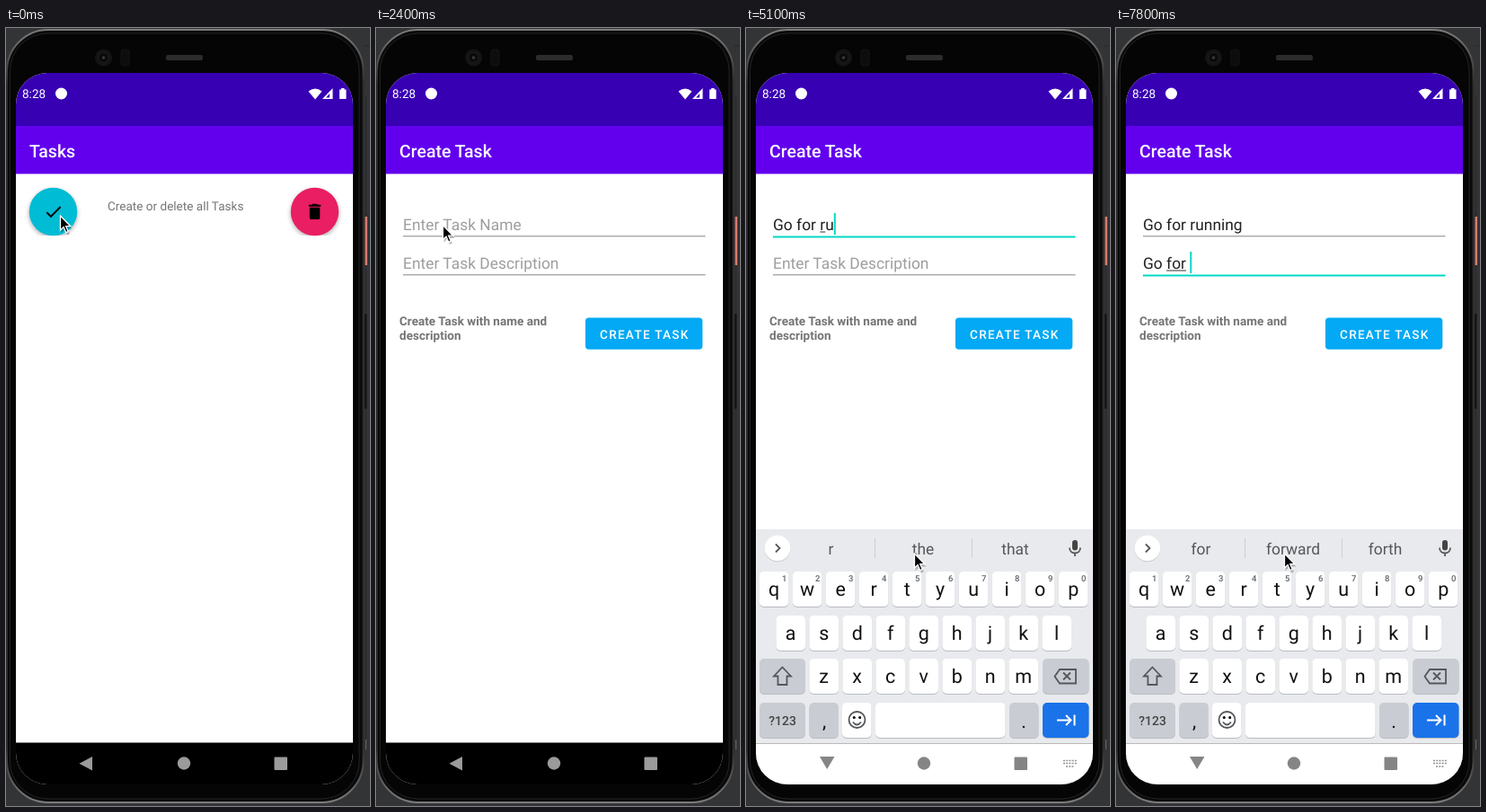
An HTML page that plays this animation: 405x866 px, repeating every 8 s.

```html
<!DOCTYPE html>
<html lang="en">
<head>
<meta charset="utf-8">
<title>Tasks</title>
<style>
  html, body { margin: 0; width: 100%; height: 100%; overflow: hidden; background: #323436; }
  svg { display: block; width: 405px; height: 866px; font-family: Roboto, sans-serif; }
  text { white-space: pre; text-rendering: geometricPrecision; }
  .mid { text-anchor: middle; }
  .title { font-size: 19.55px; font-weight: 500; fill: #fff; }
  .small { font-size: 13.55px; }
  .field { font-size: 17.42px; }
  .key { font-size: 21.5px; fill: #111; }
  .line { fill: none; stroke: #54575b; stroke-width: 1.8; }
</style>
</head>
<body>
<svg viewBox="0 0 405 866">
  <defs>
    <clipPath id="screen"><rect x="11" y="50" width="375" height="792" rx="35"/></clipPath>
    <clipPath id="fabRow"><rect x="11" y="163" width="376" height="68"/></clipPath>
    <filter id="blur" x="-40%" y="-40%" width="180%" height="180%"><feGaussianBlur stdDeviation="2.6"/></filter>
    <linearGradient id="rim" x2="0" y2="1">
      <stop offset="0" stop-color="#7c7c7c"/><stop offset=".07" stop-color="#2c2c2c"/>
      <stop offset=".93" stop-color="#2c2c2c"/><stop offset="1" stop-color="#7c7c7c"/>
    </linearGradient>
    <g id="window">
      <rect x="11" y="50" width="375" height="792" fill="#fff"/>
      <rect x="11" y="50" width="375" height="59" fill="#3700b3"/>
      <rect x="11" y="109" width="375" height="53.400" fill="#6200ee"/>
      <rect x="11" y="795.500" width="375" height="46.500" fill="#000"/>
    </g>
  </defs>

  <!-- device -->
  <rect width="405" height="866" fill="#323436"/>
  <path d="M400.500 75V800M398 20H405" stroke="#26282a" fill="none"/>
  <rect x="399.500" y="210" width="2.500" height="54" fill="#d67a6b"/>
  <rect x="399" y="318" width="2.500" height="106" rx="1" fill="#141517"/>
  <path d="M400.500 792V803" stroke="#666" fill="none"/>
  <rect x="1" y="2" width="396.500" height="860" rx="46" fill="#0a0a0a" stroke="url(#rim)" stroke-width="2"/>
  <rect x="4.500" y="6" width="388.500" height="852" rx="42" fill="#050505" stroke="#222"/>
  <circle cx="108.500" cy="33" r="9.500" fill="#141414"/>
  <circle cx="108.500" cy="33" r="5.500" fill="#0a0a0a" stroke="#1f1f1f"/>
  <circle cx="108.500" cy="33" r="1.800" fill="#3a3a3a"/>
  <rect x="128" y="24" width="9" height="18" rx="3" fill="#0d0d0d" stroke="#151515"/>
  <rect x="178" y="30" width="41" height="6" rx="2" fill="#2c2c2c"/>

  <g clip-path="url(#screen)">
    <rect x="11" y="50" width="375" height="792" fill="#000"/>

    <g id="home">
      <use href="#window"/>
      <text class="title" x="26" y="143.500">Tasks</text>
      <g clip-path="url(#fabRow)">
        <circle id="shade" cx="52.500" cy="206.500" r="27" opacity=".3" filter="url(#blur)"/>
        <circle cx="343.500" cy="206.500" r="27" opacity=".3" filter="url(#blur)"/>
      </g>
      <circle id="fab" cx="52.500" cy="204.500" r="26.700" fill="#00bcd4"/>
      <circle cx="343.500" cy="204.500" r="26.700" fill="#e91e63"/>
      <path transform="translate(41.300 193)scale(.954)" d="M9 16.170 4.830 12l-1.420 1.410L9 19 21 7l-1.410-1.410z"/>
      <path transform="translate(332.100 193)scale(.954)" d="M6 19c0 1.100.9 2 2 2h8c1.100 0 2-.9 2-2V7H6zM19 4h-3.500l-1-1h-5l-1 1H5v2h14z"/>
      <text class="small" x="113" y="203" fill="#757575">Create or delete all Tasks</text>
    </g>

    <g id="create">
      <use href="#window"/>
      <text class="title" x="26" y="143.500">Create Task</text>
      <g id="fields"></g>
      <g class="small" font-weight="700" fill="#757575">
        <text x="26" y="331">Create Task with name and</text>
        <text x="26" y="347">description</text>
      </g>
      <rect x="233" y="322.600" width="130.300" height="35.200" rx="3.800" fill="#03a9f4"/>
      <text class="small" x="249" y="345.500" fill="#fff" font-weight="500" letter-spacing="1.300">CREATE TASK</text>
    </g>

    <!-- status bar -->
    <g fill="#fff">
      <text class="small" x="18" y="78.300">8:28</text>
      <circle cx="61.500" cy="73" r="6.500"/>
      <path d="M336.500 70.500Q344 64.500 351.500 70.500L344 79.500Z"/>
      <path d="M363.500 67V79H352Z"/>
      <path d="M360 73V77.500H356Z" fill="#3700b3"/>
      <path d="M371 68.500H373V67H376.500V68.500H378.500V79H371Z"/>
    </g>

    <g id="board">
      <rect x="11" y="558" width="376" height="238.500" fill="#e8eaed"/>
      <rect x="11" y="796.500" width="376" height="46" fill="#fff"/>
      <g id="keys"></g>
      <circle cx="35" cy="580" r="14.300" fill="#c8cacd"/>
      <circle cx="35" cy="579" r="14.300" fill="#fff"/>
      <path id="chevron" class="line"/>
      <g id="tools">
        <g class="line">
          <circle cx="82.500" cy="577.500" r="5"/><path d="M86 581 92 587"/>
          <path d="M132 572H144.500V581L140 586H132ZM144.500 581H140V586M134.500 579.500Q137 583 140 579.500"/>
          <path d="M239 573H252V587H239ZM242 578H249M242 581H249M242 584H247M242.500 573V571H248.500V573"/>
        </g>
        <path d="M135 575h1.600v2H135zM140 575h1.600v2H140zM242.500 570h6v4.500h-6z" fill="#54575b"/>
        <text class="mid" x="191" y="584" font-size="14.500" font-weight="900" letter-spacing=".6" fill="#54575b">GIF</text>
        <path d="M279.500 568V590" stroke="#cbcdd1"/>
        <g fill="#54575b"><circle cx="306.500" cy="579" r="2"/><circle cx="312.500" cy="579" r="2"/><circle cx="318.500" cy="579" r="2"/></g>
      </g>
      <g id="words">
        <path d="M143.500 568V590M251.500 568V590" stroke="#cbcdd1"/>
        <g class="field mid" fill="#54575b">
          <text x="94.500" y="585.500"></text><text x="197" y="585.500"></text><text x="299.500" y="585.500"></text>
        </g>
      </g>
      <rect x="363" y="570" width="6" height="11.500" rx="3" fill="#444"/>
      <path class="line" d="M360 578.500C360 586.500 372 586.500 372 578.500M366 584.500V588"/>
    </g>

    <g id="nav">
      <path id="back"/>
      <circle cx="198" cy="818.500" r="7.200"/>
      <rect x="298.500" y="811.500" width="14.500" height="14.500" rx="1"/>
      <path id="hide" d="M353 815.500H368M353 818.500H368M356 822H365" fill="none" stroke="#909090" stroke-width="1.700" stroke-dasharray="2 1.200"/>
    </g>
  </g>

  <g id="mouse">
    <path d="M1 2V19L5 15.500 7.500 21.500 10.500 20 8 14.500H13Z" opacity=".25"/>
    <path d="M0 0V16L3.600 12.600 6.200 18.700 8.700 17.600 6.200 11.700H11.300Z" stroke="#fff" stroke-width="1.300"/>
  </g>
</svg>
<script>
const $ = id => document.getElementById(id);
const LOOP = 8000, STEP = 100;

// Typing: time, field, text with the composing part between underscores, suggestions
const typing = [
  [0, -1, '', ''],
  [2800, 0, '', ''],
  [4200, 0, '_G_', ''],
  [4300, 0, '_Go_', 'G The I'],
  [4400, 0, '_Go_', 'Go Good God'],
  [4500, 0, '_Go_ ', 'Go Good God'],
  [4600, 0, 'Go _f_', 'f for from'],
  [4700, 0, 'Go _for_', 'for forward forth'],
  [4800, 0, 'Go _for_ ', 'for forward forth'],
  [5000, 0, 'Go for _r_', 'for forward forth'],
  [5100, 0, 'Go for _r_u', 'r the that'],
  [5400, 0, 'Go for _ru_', 'ru run rub'],
  [5600, 0, 'Go for _run_', 'run running runs'],
  [5700, 0, 'Go for _runn_', 'runn running runner'],
  [6000, 0, 'Go for _runni_', 'runni running runner'],
  [6100, 0, 'Go for _runnin_', 'runnin running runner'],
  [6200, 0, 'Go for _running_', 'runnin running runnings'],
  [6400, 0, 'Go for running', 'running runnings runner'],
  [6500, 1, '', ''],
  [6900, 1, '_G_', ''],
  [7000, 1, '_Go_', 'G The I'],
  [7200, 1, '_Go_', 'Go Good God'],
  [7300, 1, '_Go_ ', 'Go Good God'],
  [7400, 1, 'Go _f_', 'Go Good God'],
  [7500, 1, 'Go _f_', 'f for from'],
  [7700, 1, 'Go _for_', 'for forward forth'],
  [7800, 1, 'Go _for_ ', 'for forward forth']
];

// Pointer: start, end, x, y
const moves = [[200, 400, 56.500, 206], [2200, 2400, 74.500, 219.500], [3000, 3500, 187.500, 585]];
const start = [60.5, 209];

const hints = ['Enter Task Name', 'Enter Task Description'];
$('fields').innerHTML = hints.map((_, i) => `<g transform="translate(30 ${225 + 43 * i})">
  <text class="field"></text><rect y="1.500" height="1" fill="#333"/>
  <rect class="rule" x="0" width="336.500"/><rect class="caret" y="-19" width="2" height="24" fill="#03dac5"/></g>`).join('');
const fields = [...$('fields').children].map(g => [...g.children]);

function key(x, y, w, fill = '#fff') {
  return `<rect x="${x}" y="${y + 1}" width="${w}" height="39" rx="5" fill="#b9bcc1"/>
    <rect x="${x}" y="${y}" width="${w}" height="39" rx="5" fill="${fill}"/>`;
}
function row(letters, x, y) {
  return [...letters].map((c, i) => {
    const cx = x + 37 * i;
    const digit = y < 610 ? `<text class="mid" x="${cx + 11.5}" y="616" font-size="9.500" font-weight="500" fill="#5f6368">${(i + 1) % 10}</text>` : '';
    return key(cx - 16.3, y, 32.6) + `<text class="key mid letter" x="${cx}" y="${y + 27}">${c}</text>` + digit;
  }).join('');
}
const grey = '#c9cdd3';
$('keys').innerHTML = row('qwertyuiop', 31.2, 605) + row('asdfghjkl', 49.7, 654) + row('zxcvbnm', 86.7, 702)
  + key(15, 702, 51, grey) + key(330, 702, 51.5, grey)
  + key(15, 751, 51, grey) + key(70.5, 751, 32.5, grey) + key(107, 751, 32.5)
  + key(144, 751, 144.5) + key(293, 751, 32.5, grey) + key(330, 751, 51.5, '#1a73e8')
  + `<path id="shift" class="line" d="M40.500 711.500 50 721.500H45.500V731H35.500V721.500H31Z"/>
  <path class="line" d="M349 714H367V729.500H349L343.500 721.700ZM353 717.500 361 725.500M361 717.500 353 725.500"/>
  <text class="mid" x="40.500" y="775.500" font-size="14" font-weight="500" fill="#444">?123</text>
  <text class="key mid" x="87" y="779">,</text><text class="key mid" x="309" y="779">.</text>
  <circle class="line" cx="123.500" cy="770" r="9"/><path class="line" d="M119 772.500Q123.500 778.500 128 772.500"/>
  <circle cx="120.300" cy="767.500" r="1.500"/><circle cx="126.700" cy="767.500" r="1.500"/>
  <path d="M346 770.500H361M356 765 361.500 770.500 356 776M365.500 764.500V776.500" fill="none" stroke="#fff" stroke-width="2"/>`;
const letters = [...document.querySelectorAll('.letter')];
const words = [...$('words').querySelectorAll('text')];

const part = (t, a, b) => Math.min(1, Math.max(0, (t - a) / (b - a)));
const show = (el, on) => el.setAttribute('display', on ? 'inline' : 'none');
function set(el, attrs) { for (const k in attrs) el.setAttribute(k, attrs[k]); }

function bezier(x, x1, y1, x2, y2) {
  const at = (u, a, b) => 3 * u * (1 - u) ** 2 * a + 3 * u * u * (1 - u) * b + u ** 3;
  let lo = 0, hi = 1;
  for (let i = 0; i < 20; i++) {
    const u = (lo + hi) / 2;
    if (at(u, x1, x2) < x) lo = u; else hi = u;
  }
  return at(lo, y1, y2);
}
// Quick start, very slow end
const emphasized = p => p < 1 / 6
  ? .4 * bezier(p * 6, .3, 0, .8, .15)
  : .4 + .6 * bezier((p - 1 / 6) * 1.2, .05, .7, .1, 1);
const zoom = s => `translate(198.500 446)scale(${s})translate(-198.500 -446)`;

function drawField(i, text, focused, caretOn) {
  const [label, under, rule, caret] = fields[i];
  const bits = text.split('_'), plain = bits.join('');
  const width = s => { label.textContent = s; return s ? label.getComputedTextLength() : 0; };
  const from = width(bits[0]), to = bits.length > 1 ? width(bits[0] + bits[1]) : from;
  set(under, { x: from, width: to - from });
  set(caret, { x: width(plain) });
  show(caret, focused && caretOn);
  label.textContent = plain || hints[i];
  set(label, { fill: plain ? '#222' : '#9e9e9e' });
  set(rule, focused ? { y: 6.5, height: 2, fill: '#03dac5' } : { y: 6.3, height: 1, fill: '#858585' });
}

function render(t) {
  // Opening the form
  const p = part(t, 1850, 2250), e = emphasized(p);
  show($('home'), p < 1);
  show($('create'), p > 0);
  set($('home'), { transform: zoom(1 + .05 * e) });
  set($('create'), { transform: zoom(.85 + .15 * e), opacity: part(t, 1900, 1983) });
  const pressed = t >= 1700;
  set($('fab'), { fill: pressed ? '#0092a5' : '#00bcd4' });
  set($('shade'), { r: pressed ? 29 : 27 });

  // Fields and suggestions
  const now = typing.filter(s => s[0] <= t).pop();
  const [since, active, text, list] = now;
  const caretOn = (t - since) % 1000 < 500;
  drawField(0, active === 1 ? 'Go for running' : text, active === 0, caretOn);
  drawField(1, active === 1 ? text : '', active === 1, caretOn);
  show($('tools'), !list);
  show($('words'), list);
  list.split(' ').forEach((w, i) => words[i].textContent = w);
  set($('chevron'), { d: list ? 'M33 574.500 37.500 579 33 583.500' : 'M37.500 574.500 33 579 37.500 583.500' });

  // Keyboard
  const k = 1 - (1 - part(t, 2800, 3200)) ** 3;
  show($('board'), k > 0);
  set($('board'), { transform: `translate(0 ${285 * (1 - k)})` });
  const caps = t >= 4100 && t < 4300;
  letters.forEach(l => l.textContent = caps ? l.textContent.toUpperCase() : l.textContent.toLowerCase());
  set($('shift'), { style: caps ? 'fill:#54575b' : '' });
  set($('nav'), { fill: k > 0 ? '#858585' : '#9b9b9b' });
  set($('back'), { d: k > 0 ? 'M82 811H98.500L90.200 825Z' : 'M81.500 818.700 96 811V826.500Z' });
  show($('hide'), k > 0);

  // Pointer
  let [x, y] = start;
  for (const [a, b, mx, my] of moves) {
    const q = part(t, a, b), s = q * q * (3 - 2 * q);
    x += (mx - x) * s;
    y += (my - y) * s;
  }
  set($('mouse'), { transform: `translate(${x} ${y})` });
}

let last = -1;
function frame() {
  const t = Math.floor(performance.now() % LOOP / STEP) * STEP;
  if (t !== last) render(last = t);
  requestAnimationFrame(frame);
}
frame();
</script>
</body>
</html>
```
